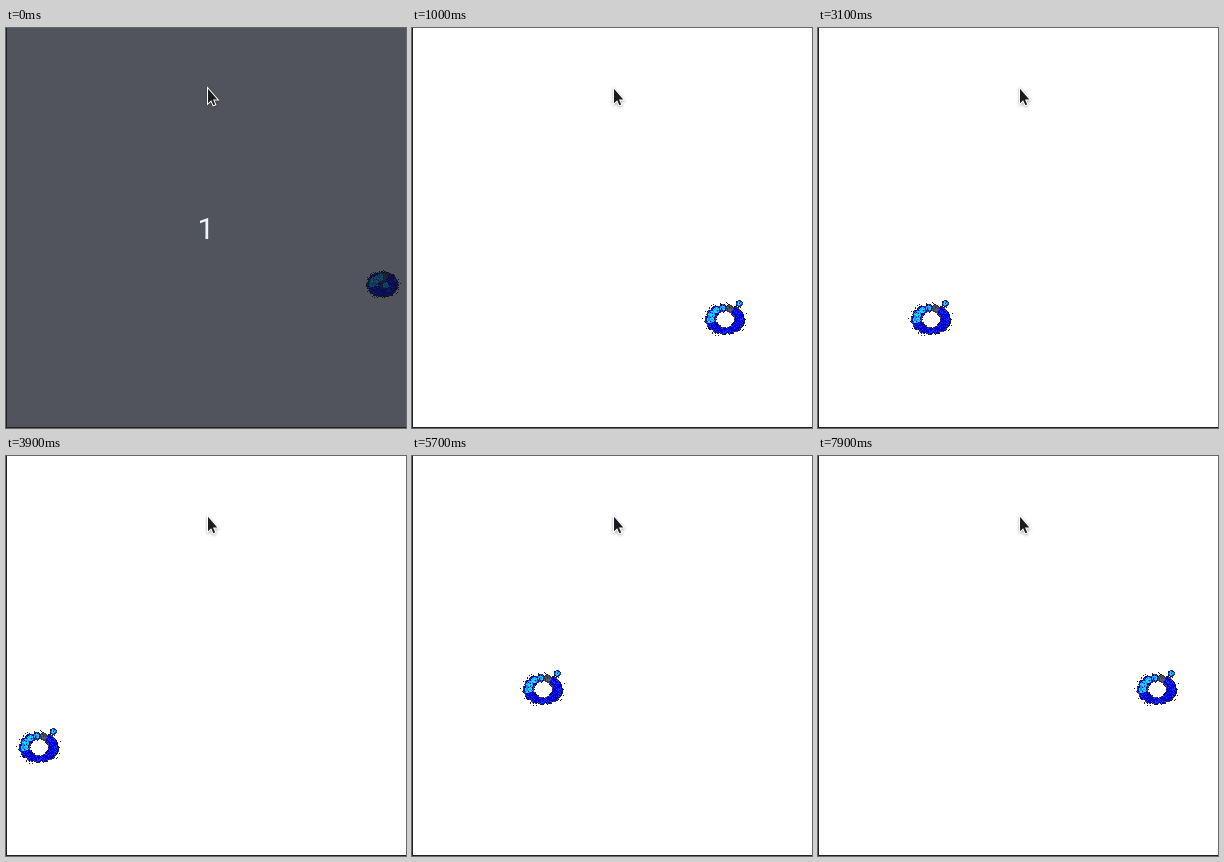
An HTML page with a canvas for the animation above (8 s loop, 400 px wide and 400 px high).

```html
<!DOCTYPE html>
<html lang="en">
<head>
<meta charset="utf-8">
<style>
html, body { margin: 0; width: 100%; height: 100%; overflow: hidden; background: #fff; }
canvas { display: block; }
</style>
</head>
<body>
<canvas id="stage" width="400" height="400"></canvas>
<script>
const ctx = document.getElementById('stage').getContext('2d');
const FRAME = 100, FRAMES = 80, STEP = 8, TICKS_PER_FRAME = 1.186;
const BLOBS = 13, SPECKS = 26;

const noise = (x, y) => {
  const v = Math.sin(x * 127.1 + y * 311.7) * 43758.5453;
  return v - Math.floor(v);
};

function pixelColor(q, n, kind) {
  if (q > 0.84) return n < 0.5 ? '#14143c' : '#44444c';
  if (kind === 'gray') return n < 0.5 ? '#38383f' : '#5a5a64';
  if (n < 0.1) return '#000080';
  if (kind === 'cyan' && q < 0.68) return n < 0.5 ? '#0a90ff' : '#1cdcff';
  return n > 0.75 ? '#1038ff' : '#0000e4';
}

// A lumpy ring of blobs around (cx, cy) with one extra blob and a halo of specks.
function makeSplat({ cx, cy, rx, ry, size, extra }) {
  const sprite = document.createElement('canvas');
  sprite.width = 48;
  sprite.height = 40;
  const g = sprite.getContext('2d');
  const blobs = [extra];
  for (let i = 0; i < BLOBS; i++) {
    const a = -1.24 + i * 2 * Math.PI / BLOBS;
    blobs.push({
      x: cx + rx * Math.cos(a),
      y: cy + ry * Math.sin(a),
      r: size + 1.6 * Math.cos(a) ** 2,
      kind: i === 0 ? 'gray' : Math.cos(a + 2.6) > 0.5 ? 'cyan' : 'blue'
    });
  }
  for (let y = 0; y < sprite.height; y++) {
    for (let x = 0; x < sprite.width; x++) {
      let near = 9, kind;
      for (const b of blobs) {
        const d = Math.hypot(x - b.x, y - b.y) / b.r;
        if (d < near) { near = d; kind = b.kind; }
      }
      const n = noise(x, y), q = near + (n - 0.5) * 0.2;
      if (q > 1.05) continue;
      g.fillStyle = pixelColor(q, n, kind);
      g.fillRect(x, y, 1, 1);
    }
  }
  g.fillStyle = '#22223c';
  for (let i = 0; i < SPECKS; i++) {
    const a = 2 * Math.PI * noise(i, 3), far = 1 + 0.2 * noise(i, 8);
    const x = cx + (rx + size + 1) * far * Math.cos(a);
    const y = cy + (ry + size) * far * Math.sin(a);
    g.fillRect(Math.round(x), Math.round(y), 1, 1);
  }
  return sprite;
}

const ring = makeSplat({
  cx: 25.5, cy: 20, rx: 14.5, ry: 11.5, size: 4,
  extra: { x: 40, y: 4, r: 3.3, kind: 'cyan' }
});
const burst = makeSplat({
  cx: 17, cy: 18, rx: 9, ry: 7.5, size: 5.2,
  extra: { x: 21, y: 19, r: 5.5, kind: 'cyan' }
});

const travel = frames => STEP * Math.round(frames * TICKS_PER_FRAME);

// Down the right side, left along the bottom, up the left side, then right.
function pose(k) {
  if (k < 4) return [burst, 359, 238 + travel(k)];
  if (k < 40) return [ring, 295 - travel(k - 9), 271];
  if (k < 47) return [burst, 12, 212 + travel(46 - k)];
  return [ring, 9 + travel(k - 47), 213];
}

const pointer = new Path2D('M202 60.8V75.2L205.2 72.3L207.4 77.3L209.2 76.5L207 71.4H211.3Z');

function drawPointer() {
  ctx.save();
  ctx.shadowColor = 'rgba(0,0,0,.35)';
  ctx.shadowBlur = 3;
  ctx.shadowOffsetY = 1;
  ctx.lineWidth = 2;
  ctx.strokeStyle = '#fff';
  ctx.stroke(pointer);
  ctx.restore();
  ctx.fillStyle = '#1c1c20';
  ctx.fill(pointer);
}

function drawCountdown() {
  ctx.fillStyle = 'rgba(14,18,29,.72)';
  ctx.fillRect(0, 0, 400, 400);
  ctx.fillStyle = '#f0f4ff';
  ctx.font = '30px Roboto, Arial, sans-serif';
  ctx.fillText('1', 191.5, 211);
}

function draw(k) {
  ctx.fillStyle = '#fff';
  ctx.fillRect(0, 0, 400, 400);
  ctx.drawImage(...pose(k));
  if (k === 0) drawCountdown();
  ctx.fillStyle = '#202126';
  ctx.fillRect(0, 0, 1, 400);
  ctx.fillRect(0, 399, 400, 1);
  drawPointer();
}

const start = performance.now();
function tick() {
  draw(Math.floor((performance.now() - start) / FRAME) % FRAMES);
  requestAnimationFrame(tick);
}
tick();
</script>
</body>
</html>
```
